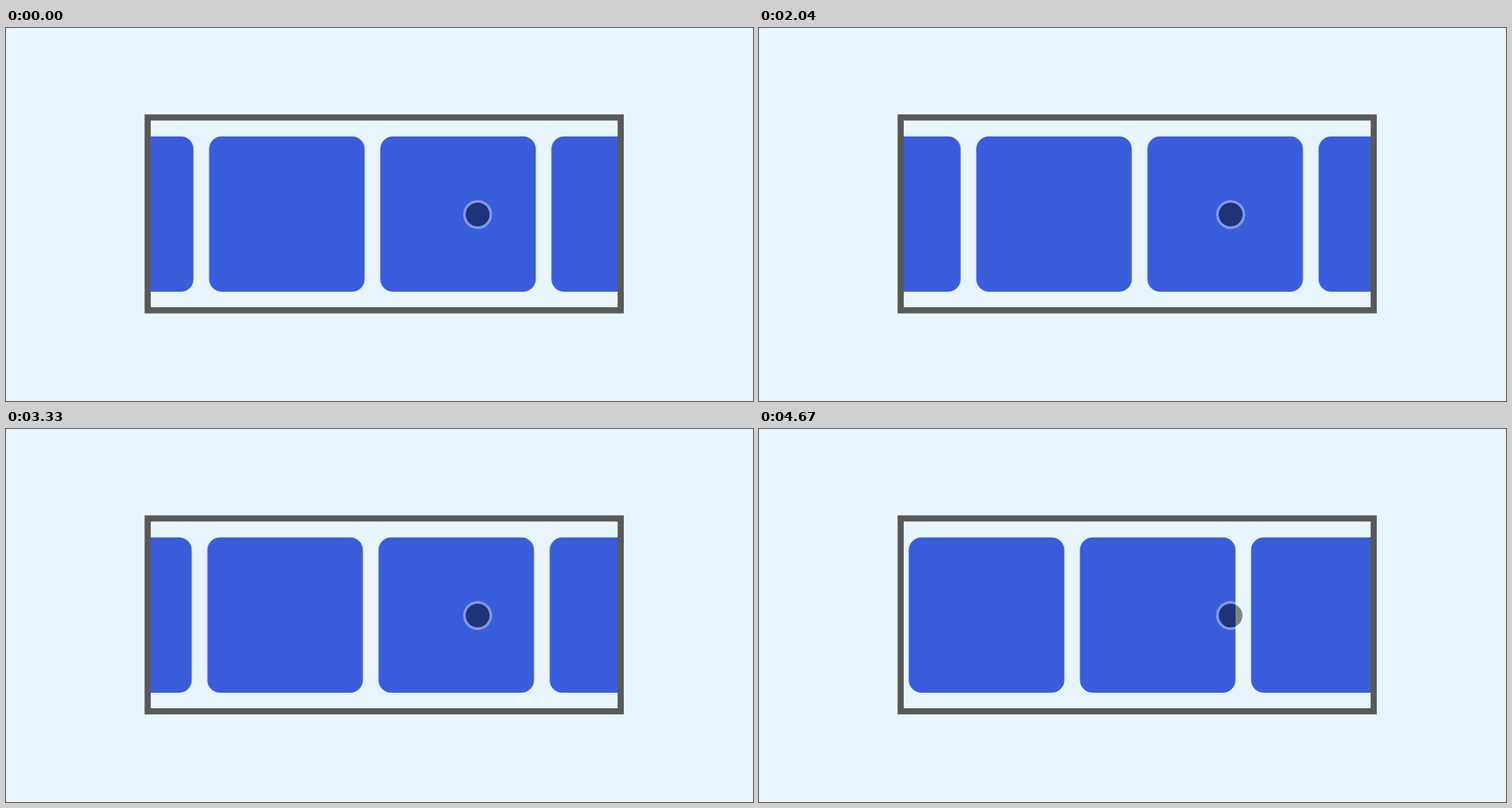
An HTML page for the animation above (4710 ms loop, 1058x529 px).

```html
<!DOCTYPE html>
<html lang="en">
<head>
<meta charset="utf-8">
<title>Scroller returning to its end</title>
<style>
  html, body {
    margin: 0;
    width: 100%;
    height: 100%;
    overflow: hidden;
    background: #e9f5fc;
  }
  svg {
    display: block;
    position: absolute;
    left: 0;
    top: 0;
  }
</style>
</head>
<body>
<svg width="1058" height="529" viewBox="0 0 1058 529">
  <clipPath id="port"><rect x="205" y="131" width="661.4" height="265"/></clipPath>
  <g clip-path="url(#port)"><g id="track" fill="#395ddb"></g></g>
  <path fill="#595959" fill-rule="evenodd"
        d="M196.3 122.5H875V404.7H196.3ZM205 131.2V396H866.3V131.2Z"/>
  <circle cx="668" cy="264.5" r="18.7" fill="none" stroke="#e9f5fc" stroke-opacity=".4" stroke-width="3.8"/>
  <circle cx="668" cy="264.5" r="16.8" fill="#000" fill-opacity=".45"/>
</svg>
<script>
  const LOOP = 4710, FRAMES = 113;
  const TILES = 5, PITCH = 242.4, SIZE = 220.3, LEFT = 227.1;
  const MAX_SCROLL = 573.2;
  const SNAP = 'cubic-bezier(.42, 0, .58, 1)';
  const SWIPE = 'cubic-bezier(.36, .1, .65, 1)';

  // [time in ms, scroll position, easing towards the next step]
  const steps = [
    [-211, 0, SNAP],
    [329, MAX_SCROLL, 'linear'],
    [1520, MAX_SCROLL, SWIPE],
    [3080, 0, 'linear'],
    [3122, 0, SNAP],
    [3662, MAX_SCROLL, 'linear'],
    [3980, MAX_SCROLL, SWIPE],
    [4749, 0, 'linear']
  ];

  const track = document.getElementById('track');
  for (let i = 0; i < TILES; i++) {
    const tile = document.createElementNS('http://www.w3.org/2000/svg', 'rect');
    const attrs = { x: LEFT + i * PITCH, y: 153.7, width: SIZE, height: SIZE, rx: 18 };
    for (const name in attrs) tile.setAttribute(name, attrs[name]);
    track.append(tile);
  }

  const first = steps[0][0];
  const duration = steps[steps.length - 1][0] - first;
  const scroll = track.animate(
    steps.map(([time, pos, easing]) => ({
      offset: (time - first) / duration,
      transform: `translateX(${-pos}px)`,
      easing
    })),
    { duration, fill: 'both' }
  );
  scroll.pause();

  const frameTime = LOOP / FRAMES;
  const start = performance.now();

  function draw(now) {
    const time = Math.max(0, now - start) % LOOP;
    const frame = Math.min(FRAMES - 1, Math.floor((time + 8) / frameTime));
    scroll.currentTime = frame * frameTime - first;
    requestAnimationFrame(draw);
  }
  draw(start);
</script>
</body>
</html>
```
